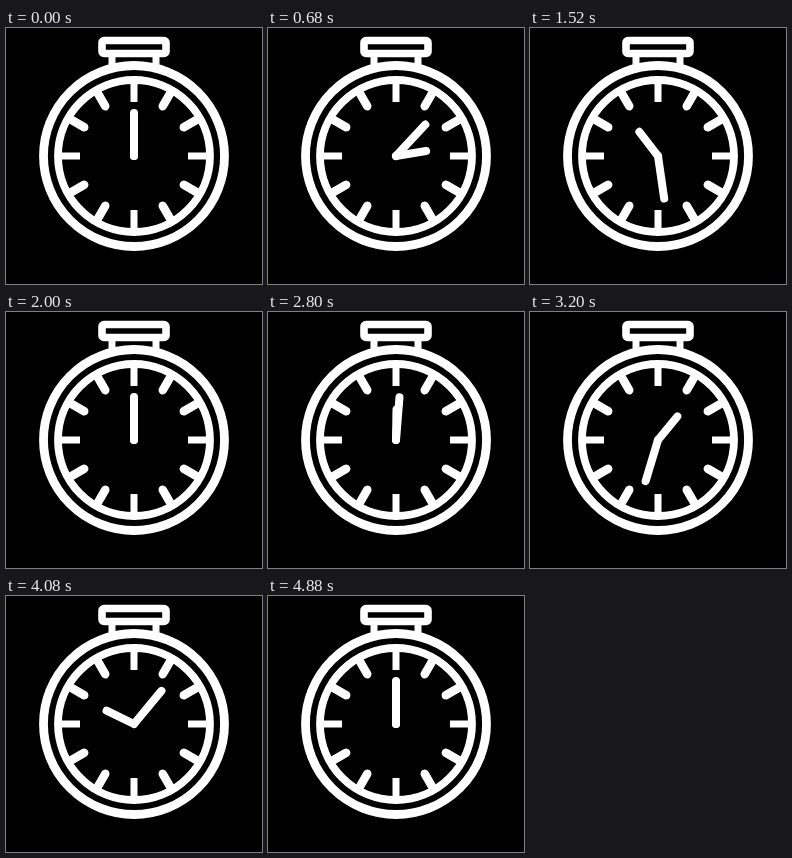
An HTML page with a canvas that plays this animation: 256x256 px, repeating every 5360 ms.

```html
<!DOCTYPE html>
<html lang="en">
<head>
<meta charset="utf-8">
<title>Stopwatch</title>
<style>
  html, body { margin: 0; width: 100%; height: 100%; overflow: hidden; background: #000; }
  canvas { display: block; width: 256px; height: 256px; }
</style>
</head>
<body>
<canvas id="stage" width="256" height="256"></canvas>
<script>
const ctx = document.getElementById('stage').getContext('2d');
const CENTER = 128;
const STEP_MS = 40;
const LOOP_MS = 5360;
const SWEEPS = [{ start: 0, end: 2000 }, { start: 2720, end: 4680 }];
const TAU = Math.PI * 2;

function bezier(s, p1, p2) {
  const r = 1 - s;
  return 3 * p1 * s * r * r + 3 * p2 * s * s * r + s * s * s;
}

function ease(x) {
  if (x <= 0) return 0;
  if (x >= 1) return 1;
  let low = 0, high = 1;
  for (let i = 0; i < 30; i++) {
    const mid = (low + high) / 2;
    if (bezier(mid, 0.47, 0.53) < x) low = mid; else high = mid;
  }
  return bezier(low, 0, 1);
}

function progressAt(ms) {
  const time = Math.floor(ms / STEP_MS) * STEP_MS % LOOP_MS;
  const { start, end } = SWEEPS[time < SWEEPS[1].start ? 0 : 1];
  return ease((time - start) / (end - start));
}

function ring(radius, width) {
  ctx.lineWidth = width;
  ctx.beginPath();
  ctx.arc(CENTER, CENTER, radius, 0, TAU);
  ctx.stroke();
}

function line(x1, y1, x2, y2, width, cap) {
  ctx.lineWidth = width;
  ctx.lineCap = cap;
  ctx.beginPath();
  ctx.moveTo(x1, y1);
  ctx.lineTo(x2, y2);
  ctx.stroke();
}

// Angle in turns, clockwise from twelve o'clock.
function spoke(turn, from, to, width, cap) {
  const dx = Math.sin(turn * TAU), dy = -Math.cos(turn * TAU);
  line(CENTER + dx * from, CENTER + dy * from,
       CENTER + dx * to, CENTER + dy * to, width, cap);
}

function drawCase() {
  ring(90.5, 8.8);
  ring(76, 7.8);
  for (let hour = 0; hour < 12; hour++) {
    if (hour % 3) spoke(hour / 12, 57.5, 74, 8.5, 'round');
    else spoke(hour / 12, 54, 74, 7, 'butt');
  }
  ctx.lineWidth = 7.6;
  ctx.beginPath();
  ctx.roundRect(96, 12.5, 64, 13, 2);
  ctx.stroke();
  for (const x of [106, 150]) line(x, 27, x, 40, 7, 'butt');
}

function draw(ms) {
  ctx.fillStyle = '#000';
  ctx.fillRect(0, 0, 256, 256);
  ctx.strokeStyle = '#fff';
  drawCase();
  const progress = progressAt(ms);
  spoke(progress, 0, 30.5, 8, 'round');
  spoke(progress * 5, 0, 43, 8, 'round');
}

const origin = performance.now();
function tick() {
  draw(performance.now() - origin);
  requestAnimationFrame(tick);
}
tick();
</script>
</body>
</html>
```
